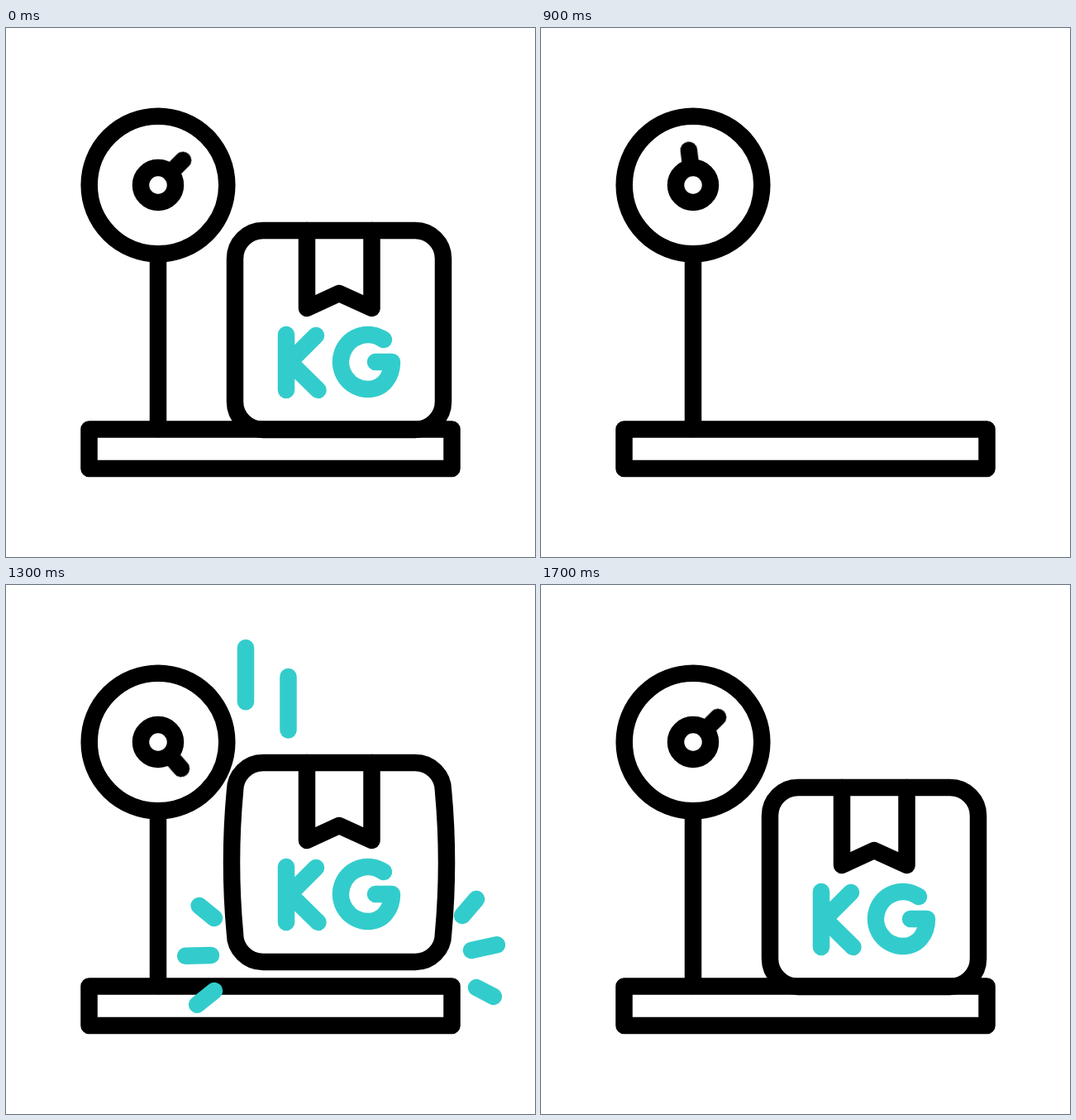
These frames come from a looping animation (640x640 px, 2260 ms). An HTML page:

```html
<!DOCTYPE html>
<html lang="en">
<head>
<meta charset="utf-8">
<title>Parcel scale</title>
<style>
  html, body { margin: 0; width: 100%; height: 100%; overflow: hidden; background: #fff; }
  svg { display: block; width: 100vw; height: 100vh; }
  .ink, .teal { fill: none; stroke: #000; stroke-width: 20.5; stroke-linecap: round; stroke-linejoin: round; }
  .teal { stroke: #3cc; }
  #needle { transform-origin: 184px 190px; }
</style>
</head>
<body>
<svg viewBox="0 0 640 640" role="img" aria-label="Parcel dropping onto a scale">
  <g class="ink">
    <path d="M184 274V485"/>
    <rect x="100.5" y="485.5" width="439" height="47.5"/>
    <circle cx="184" cy="190" r="83.3"/>
    <circle cx="184" cy="190" r="21"/>
    <path id="needle" d="M184 166V147.5"/>
  </g>
  <g id="box">
    <path id="shell" class="ink"/>
    <path class="ink" d="M364 245V339L403 321L442.500 339V245"/>
    <path class="teal" d="M339 371V438M375 372L343 404L377.500 438"/>
    <path class="teal" d="M457 377A33 33 0 1 0 438 437C456 437 467 422 467 404H447"/>
  </g>
  <g id="streaks" class="teal"></g>
</svg>
<script>
const LOOP = 2260;
const ACCEL = 'cubic-bezier(.333,0,.667,.333)';
const DECEL = 'cubic-bezier(.333,.667,.667,1)';
const SMOOTH = 'ease-in-out';
const $ = id => document.getElementById(id);

// Steps are [ms, value, easing towards the next step].
function play(el, prop, steps, format = v => v) {
  const full = [[0, steps[0][1]], ...steps, [LOOP, steps[steps.length - 1][1]]];
  const frames = full.map(([ms, value, easing = 'linear']) =>
    ({ offset: ms / LOOP, [prop]: format(value), easing }));
  el.animate(frames, { duration: LOOP, iterations: Infinity });
}

// Parcel outline; bend moves the middle of both sides inwards.
function shell(bend) {
  const b = 2 * bend;
  return `M311 245H495A34 34 0 0 1 529 279Q${529 - b} 365.500 529 452` +
    `A34 34 0 0 1 495 486H311A34 34 0 0 1 277 452Q${277 + b} 365.500 277 279A34 34 0 0 1 311 245Z`;
}
$('shell').setAttribute('d', shell(0));
play($('shell'), 'd', [
  [1160, 0, DECEL], [1300, -4, SMOOTH], [1430, 0, SMOOTH], [1520, 3, SMOOTH], [1700, 0]
], bend => `path("${shell(bend)}")`);

play($('box'), 'transform', [
  [220, [0, 0], ACCEL], [330, [420, 0]], [900, [420, 0]],
  [900, [0, -500]], [1080, [0, -149]], [1160, [0, 0], DECEL],
  [1300, [0, -30], ACCEL], [1420, [0, 0]], [1440, [0, 0], DECEL],
  [1520, [0, -19], ACCEL], [1700, [0, 0]]
], ([x, y]) => `translate(${x}px, ${y}px)`);

play($('needle'), 'transform', [
  [220, 45, ACCEL], [300, 30], [360, 2, DECEL], [480, -40, SMOOTH], [620, 5, SMOOTH], [720, -7],
  [1140, -7, SMOOTH], [1300, 139, SMOOTH], [1420, 45]
], deg => `rotate(${deg}deg)`);

// A streak draws itself from its first point, then empties the same way.
function streak(d, grow, grown, shrink, gone) {
  const path = document.createElementNS('http://www.w3.org/2000/svg', 'path');
  path.setAttribute('d', d);
  path.setAttribute('pathLength', 1);
  $('streaks').append(path);
  play(path, 'strokeDasharray', [[grow, 0], [grown, 1]], len => `${len} 3`);
  play(path, 'strokeDashoffset', [[shrink, 0], [gone, -0.99]]);
  play(path, 'opacity', [[grow, 0], [grow, 1], [gone + 10, 1], [gone + 10, 0]]);
}

streak('M341.500 111V175.500', 1040, 1150, 1440, 1520);
streak('M290 76V180', 1210, 1355, 1440, 1570);
[
  'M252 403L230 385', 'M248 448L211 449', 'M252 491L227 511',
  'M552 400L572.500 376', 'M563 442L600 434', 'M569 487L594 500'
].forEach(d => streak(d, 1180, 1325, 1440, 1520));
</script>
</body>
</html>
```
